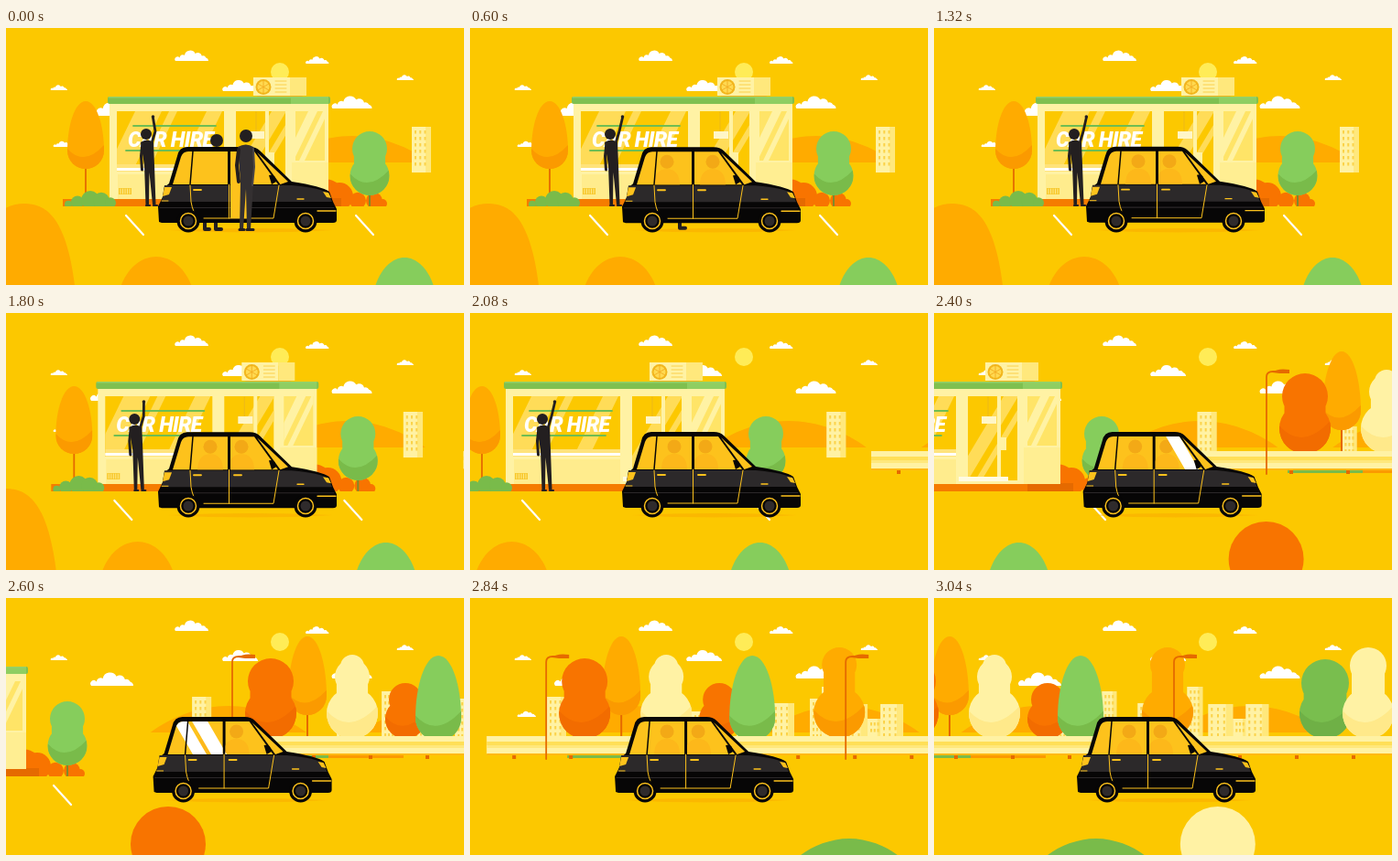
Recreate the animation shown at these times as an HTML page with a canvas. Size 500x281 px, loop 3.08 s.

```html
<!DOCTYPE html>
<html lang="en">
<head>
<meta charset="utf-8">
<title>Car hire</title>
<style>
html, body { margin: 0; width: 100%; height: 100%; overflow: hidden; background: #fcc800 }
canvas { display: block; width: 100vw; height: 100vh }
</style>
</head>
<body>
<canvas id="stage" width="500" height="281"></canvas>
<script>
const g = document.getElementById('stage').getContext('2d');
const LOOP = 3080, STEP = 40;
const SKY = '#fcc800', PALE = '#fff2a4', CREAM = '#ffe87c', ORANGE = '#ffab00', AMBER = '#fb9a00',
  RED = '#f87400', RUST = '#e56a00', GREEN = '#86cd5c', LEAF = '#79bb4a',
  INK = '#231f20', BLACK = '#070606', GOLD = '#fdc21c';

const box = (x, y, w, h, c) => { g.fillStyle = c; g.fillRect(x, y, w, h); };
const disc = (x, y, r, c) => { g.fillStyle = c; g.beginPath(); g.arc(x, y, r, 0, 7); g.fill(); };
const fill = (d, c) => { g.fillStyle = c; g.fill(new Path2D(d)); };
const line = (d, c, w = 1) => {
  g.strokeStyle = c; g.lineWidth = w; g.lineCap = g.lineJoin = 'round';
  g.stroke(new Path2D(d));
};
const group = (x, y, draw, clip) => {
  g.save(); g.translate(x, y);
  if (clip) g.clip(new Path2D(clip));
  draw(); g.restore();
};
const ramp = (t, a, b) => {
  const u = Math.min(1, Math.max(0, (t - a) / (b - a)));
  return u * u * (3 - 2 * u);
};

// Distance driven: time, place and speed at a few points, joined by cubics
const DRIVE = [[1500, 0, 0], [2080, 74, .35], [2400, 214, .51], [2600, 330, .63], [3040, 642, .75]];
function distance(t) {
  if (t <= DRIVE[0][0]) return 0;
  let i = 0;
  while (i < DRIVE.length - 2 && t > DRIVE[i + 1][0]) i++;
  const [t0, p0, v0] = DRIVE[i], [t1, p1, v1] = DRIVE[i + 1], h = t1 - t0, u = (t - t0) / h;
  return p0 + u * v0 * h + u * u * (3 * (p1 - p0) - h * (2 * v0 + v1))
    + u * u * u * (2 * (p0 - p1) + h * (v0 + v1));
}

function cloud(x, base, w) {
  group(x, base, () => {
    g.scale(w / 40, w / 40);
    fill('M-20 0A3 3 0 0 1-15-4A4 4 0 0 1-9-7A7 7 0 0 1 4-9A5 5 0 0 1 12-6A4 4 0 0 1 17-4Q20-3 20 0Z', '#fff');
  });
}

const hill = x => fill(`M${x - 85} 147C${x - 62} 130 ${x - 32} 118 ${x} 118S${x + 62} 130 ${x + 85} 147Z`, ORANGE);

function tower(x, top, w, bottom = 158) {
  box(x, top, w, bottom - top, PALE);
  box(x + w * .72, top, w * .28, bottom - top, CREAM);
  for (let y = top + 4; y < bottom - 8; y += 7)
    for (let i = 0; i < 3; i++) box(x + 3 + i * w * .25, y, 2, 3.5, '#fbd34a');
}

function shaded(shape, x, y, r, c, dark) {
  g.save();
  g.fillStyle = c; g.fill(shape); g.clip(shape);
  fill(`M${x - r} ${y - r * .1}Q${x - r * .1} ${y + r * .9} ${x + r} ${y - r * .3}V${y + r}H${x - r}Z`, dark);
  g.restore();
}

function blobTree(x, top, bottom, r1, r2, c, dark) {
  const y1 = top + r1, y2 = bottom - r2, n = r1 * .9, p = new Path2D();
  p.arc(x, y1, r1, 0, 7); p.closePath();
  p.moveTo(x + r2, y2); p.arc(x, y2, r2, 0, 7); p.closePath();
  p.rect(x - n, y1, 2 * n, y2 - y1);
  shaded(p, x, y2, r2, c, dark);
}

function dropTree(x, top, bottom, r, c, dark) {
  const y = bottom - r, m = top + (y - top) * .5;
  shaded(new Path2D(`M${x} ${top}C${x + r * .6} ${top} ${x + r} ${m} ${x + r} ${y}
    A${r} ${r} 0 0 1 ${x - r} ${y}C${x - r} ${m} ${x - r * .6} ${top} ${x} ${top}`), x, y, r, c, dark);
}

const bush = (lumps, c) => group(0, 0, () => lumps.forEach(([x, r]) => disc(x, 196 - r * .8, r, c)),
  'M0 100H1000V195H0Z');

function lamp(x) {
  line(`M${x} 176V70Q${x} 64 ${x + 7} 64H${x + 14}`, RUST, 1.8);
  fill(`M${x + 6} 65Q${x + 12} 60 ${x + 25} 62V66H${x + 14}Z`, RUST);
}

function roadside() {
  blobTree(897, 54, 153, 19, 28, ORANGE, AMBER);
  line('M659 100V152', RUST, 2);
  dropTree(659, 42, 128, 21, ORANGE, AMBER);
  blobTree(619, 66, 154, 25, 28, RED, '#f26c00');
  disc(708, 75, 13, PALE);
  blobTree(708, 67, 154, 19, 28, PALE, '#ffe98a');
  blobTree(766, 93, 154, 18, 22, RED, '#f26c00');
  dropTree(802, 63, 156, 25, GREEN, LEAF);
  blobTree(1069, 67, 154, 26, 28, '#79be4e', '#6fb046');
  blobTree(1116, 54, 154, 20, 28, PALE, '#ffe98a');
  box(600, 171, 82, 4, LEAF);
  box(682, 171, 82, 4, AMBER);
  for (let x = 540; x < 1250; x += 62) box(x, 170, 4, 6, RUST);
  box(512, 151, 740, 20, PALE);
  box(512, 157, 740, 4, '#ffdf57');
  box(512, 161, 740, 3, CREAM);
  box(512, 170, 740, 2, '#ffb915');
  lamp(577); lamp(904);
}

function waver(t) {
  const hand = 163 + 3.5 * Math.cos((t - 600) / 370 * 2 * Math.PI);
  line('M149 126L147.500 140L148.500 155', INK, 3);
  fill('M147 125Q154 120 161 125L162 150L163.500 193H160L156.500 158L156 193H152.500L151 150Z', INK);
  line('M153 194H157M161 194H165', INK, 2.2);
  line(`M159 126L163 113L${hand} 98`, INK, 2.8);
  disc(hand, 97, 1.8, INK);
  disc(153, 116, 6, INK);
}

function shop(t) {
  // air conditioner
  box(274, 72, 50, 4, '#f3b51b');
  box(270, 54, 40, 20, PALE);
  box(310, 54, 18, 20, CREAM);
  disc(281, 64.500, 8.500, '#f2b61c');
  disc(281, 64.500, 6.500, '#ffd950');
  line('M275 61L287 68M275 68L287 61M281 58V71', '#f2a81c', .8);
  for (let y = 58; y < 71; y += 4) line(`M294 ${y}H306`, '#fbd04a', 1);
  // front and side walls
  box(62, 187, 254, 8, '#f57c00');
  box(316, 186, 50, 9, RUST);
  box(113, 83, 239, 104, PALE);
  box(121, 91, 117, 66, SKY);
  group(0, 0, () => {
    fill('M141 91H170L138 157H109ZM178 91H187L155 157H146ZM219 91H236L204 157H187Z', '#ffdc58');
    fill('M121 149H238V157H121Z', '#ffe37b');
  }, 'M121 91H238V157H121Z');
  box(121, 153, 117, 3, '#fff');
  box(122, 160, 116, 27, '#ffec8d');
  box(123, 175, 14, 7, '#f8c82b');
  for (let x = 125; x < 137; x += 2.500) line(`M${x} 176V181`, PALE, .8);
  box(251, 91, 54, 92, SKY);
  group(0, 0, () => fill('M290 91H306L251 183H235ZM314 91H321L266 183H259Z', '#ffdc58'), 'M251 91H305V183H251Z');
  box(283, 91, 4, 92, PALE);
  line('M273 92V113', '#e9b420', .8);
  box(266, 113, 16, 8, '#fff6c7');
  box(285, 136, 8, 14, PALE);
  box(241, 179, 54, 5, '#fffbe2');
  box(316, 91, 32, 54, '#ffe467');
  group(0, 0, () => fill('M330 91H340L314 145H304ZM346 91H352L326 145H320Z', PALE), 'M316 91H348V145H316Z');
  box(312, 147, 40, 40, '#ffee92');
  // roof
  g.fillStyle = '#7fc050';
  g.beginPath(); g.roundRect(111, 75, 243, 8, 2); g.fill();
  box(311, 75, 41, 8, '#8fce62');
  box(112, 75, 240, 1.500, '#95d167');
  // lettering
  line('M139 107H229M131 134H222', '#6fbd53', 1.800);
  g.fillStyle = '#fff';
  g.font = 'italic 900 23px Roboto, "Liberation Sans", sans-serif';
  g.letterSpacing = '-0.8px';
  g.fillText('CAR HIRE', 133, 129.500);
  waver(t);
}

function lot(t) {
  bush([[350, 17], [364, 15], [384, 9], [402, 9], [411, 5]], RED);
  shop(t);
  line('M397 175V194', '#7d8b2b', 2);
  blobTree(397, 113, 183, 19, 21.500, GREEN, LEAF);
  line('M87 140V190', RUST, 1.800);
  dropTree(87, 80, 154, 20, ORANGE, AMBER);
  bush([[68, 4], [78, 7], [92, 10], [104, 9], [114, 6]], LEAF);
  line('M131 205L150 226M382 205L401 226', '#fff', 2.200);
}

const REAR = 'M182 171L191 141Q193 135 199 135H242V171Z';
const FRONT = 'M245 135H271L297 171H245Z';

function rider(x) {
  fill(`M${x - 14} 172Q${x - 14} 154 ${x} 154T${x + 14} 172Z`, '#fdb81a');
  disc(x, 146, 7.5, '#f3a916');
}

function wheel(x) {
  disc(x, 211, 12.500, BLACK);
  g.strokeStyle = GOLD; g.lineWidth = 1.500;
  g.beginPath(); g.arc(x, 211, 8.500, 0, 7); g.stroke();
  disc(x, 211, 5.500, '#2f2b2c');
}

function person(t) {
  const p = ramp(t, 0, 340);
  group(262 - 7 * p, 222 - 14 * p, () => {
    g.scale(1 - .15 * p, 1 - .35 * p);
    g.rotate(-.08 * p);
    fill('M-9-92Q0-97 8-92L8-52L5-2H1L0-46L-3-2H-7L-6-54Z', '#343031');
    line('M-8-89L-10-72L-8-54', INK, 4);
    line('M8-90L9-70L7-50', '#4a4546', 2);
    line('M-7-1.500H-2M1-1.500H8', INK, 3);
    disc(0, -104, 7, INK);
  });
}

function backPerson(t) {
  const p = ramp(t, 40, 400);
  disc(230, 123 + 26 * p, 7, INK);
  box(224, 130 + 20 * p, 13, 20, INK);
  group(0, -12 * ramp(t, 560, 760), () => line('M229 205V220H235', INK, 4));
  group(0, -14 * ramp(t, 120, 420), () => line('M217 205V220H222', INK, 4));
  group(0, -10 * ramp(t, 560, 700), () => { if (t > 400) line('M266 205V213H271', INK, 3.500); });
}

function car(t) {
  fill('M176 221Q266 217 358 221Q266 226 176 221Z', '#fbb800');
  if (t < 800) backPerson(t);
  const shake = t < 2000 ? .35 * Math.sin(t / 45) + ramp(t, 180, 320) - ramp(t, 320, 480) : 0;
  group(0, shake, () => {
    fill(`M167 212L166 195L171 185L173 174L178 170L187 140Q189 130 198 130H266Q273 130 277 134
      L312 168Q345 173 353 179L357 190L361 198V210Q361 213 357 213H170Z`, BLACK);
    fill('M173 172H312Q345 175 352 181L356 190H170Z', '#2c292a');
    line('M168 196.500H358', '#2c292a', 1.200);
    fill('M274 136L308 168L299.500 171Z', GOLD);
    group(0, 0, () => {
      box(180, 130, 125, 45, GOLD);
      g.globalAlpha = ramp(t, 160, 420);
      const settle = ramp(t, 600, 960);
      rider(215 + 8 * settle); rider(265 - 8 * settle);
      g.globalAlpha = 1;
      const x = 256 - .34 * (t - 2400);
      if (t > 2000) fill(`M${x} 134h15l22 38h-15ZM${x + 20} 134h17l22 38h-17Z`, '#fff');
    }, REAR + FRONT);
    line('M204 135L201 171', BLACK, 1.500);
    line('M201 172L202 190Q204 202 210 209M243.500 171V208M298 172L292 208H216', GOLD, 1);
    line('M205 177H213M249 177H257', GOLD, 1.800);
    fill('M173 174H181L178 182L171 184Z', GOLD);
    line('M170 189H177', GOLD, 1);
    fill('M346 179L352 180L355 186L350 185Z', GOLD);
    line('M318 187H325M340 200H360', GOLD, 1.300);
    fill('M287 161Q294 159 295 168L290 171Z', BLACK);

    // front door, hinged at its leading edge
    const edge = 266 - 21 * ramp(t, 300, 480);
    if (edge > 245.500) {
      box(245, 135, edge - 245, 73, GOLD);
      line(`M${edge} 135V208`, BLACK, 2.500);
      if (t >= 240) group(0, 0, () => person(t), `M245 120H${edge}V208H245Z`);
    }
  });
  wheel(199); wheel(327);
  if (t < 240) person(t);
}

const mound = (x, top, w, c) =>
  fill(`M${x - w} 290C${x - w * .84} ${top + 14} ${x - w * .42} ${top} ${x} ${top}S${x + w * .84} ${top + 14} ${x + w} 290Z`, c);

function foreground() {
  mound(20, 192, 56, ORANGE);
  mound(164, 250, 41, ORANGE);
  mound(435, 251, 34, GREEN);
  disc(705, 269, 41, RED);
  mound(1204, 263, 62, LEAF);
  disc(1337, 269, 41, PALE);
}

function draw(t) {
  const s = distance(t);
  box(0, 0, 500, 281, SKY);
  disc(299, 48, 10, '#ffec57');
  [[203, 36, 36], [340, 39, 25], [58, 68, 18], [256, 69, 38], [378, 88, 43], [436, 57, 18], [116, 96, 46], [62, 130, 20]]
    .forEach(c => cloud(...c));
  group(-s * .41, 0, () => { hill(378); hill(608); });
  group(-s * .727, 0, () => {
    tower(443, 108, 21);
    tower(601, 124, 16); tower(650, 102, 16);
    tower(689, 115, 24); tower(730, 110, 16); tower(743, 97, 17);
    tower(766, 116, 27); tower(793, 132, 15); tower(807, 116, 25);
  });
  group(-s, 0, () => { roadside(); lot(t); });
  group(-Math.max(0, t - 2080) * .0104, 0, () => car(t));
  group(-s * 1.6, 0, foreground);
}

function tick() {
  draw(Math.floor(performance.now() % LOOP / STEP) * STEP);
  requestAnimationFrame(tick);
}
tick();
</script>
</body>
</html>
```
